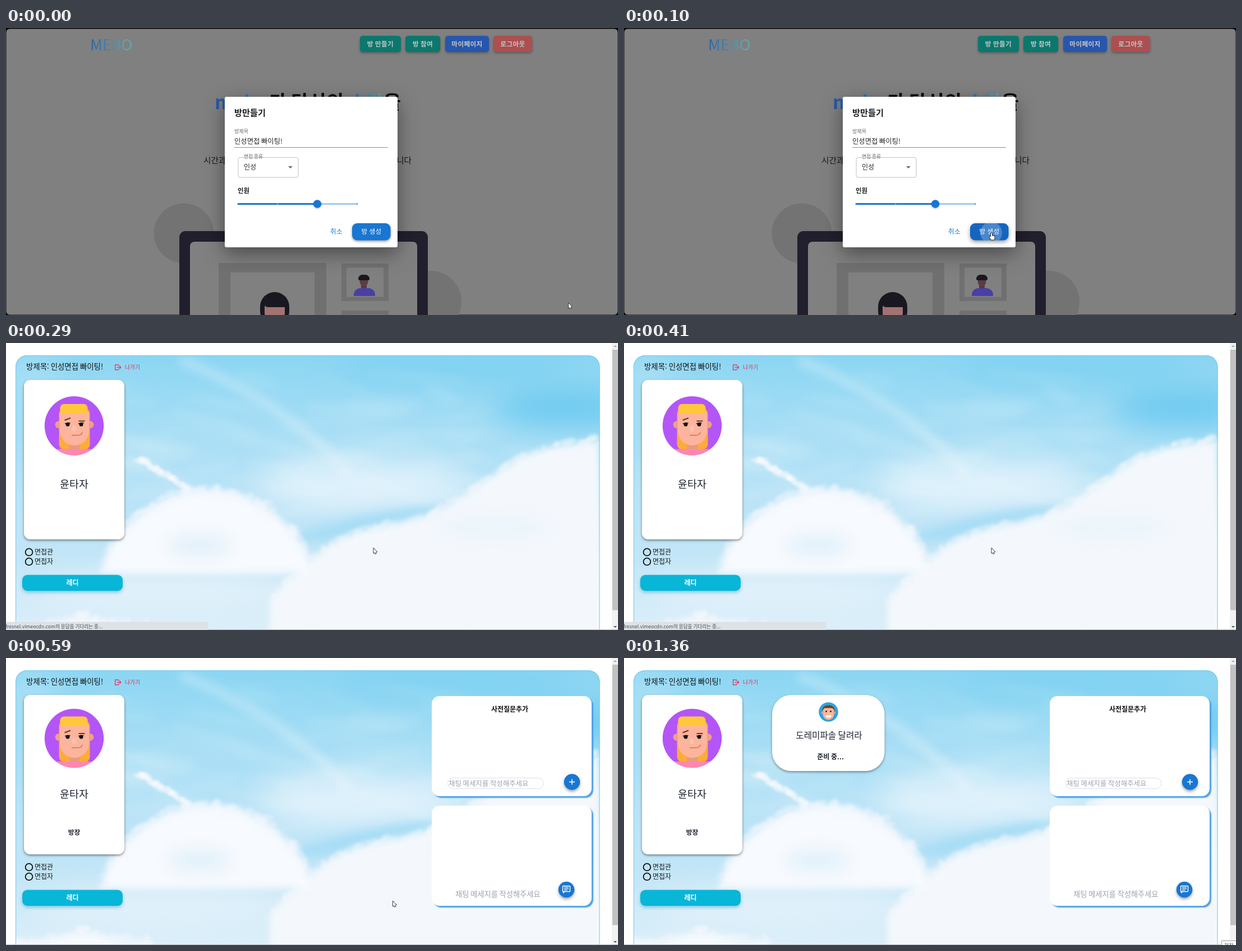
Write an HTML page with a canvas that moves like this. It is 1091 px wide and 513 px high and loops after 1800 ms.

```html
<!DOCTYPE html>
<html lang="ko">
<head>
<meta charset="utf-8">
<title>면접 방 만들기</title>
<style>
  html, body { margin: 0; width: 100%; height: 100%; overflow: hidden; background: #fff; }
  canvas { display: block; }
</style>
</head>
<body>
<canvas id="stage" width="1091" height="513"></canvas>
<script>
const W = 1091, H = 513, LOOP = 1800;
const CUTS = [100, 200, 290, 490, 590, 690];
const FONT = '"Noto Sans CJK KR", "Noto Sans CJK", "Noto Sans", sans-serif';
const BLUE = '#1976d2', INK = '#1c2330';
const stage = document.getElementById('stage');
let ctx = stage.getContext('2d');

// ---- helpers ----
// y is the optical centre of the line
function text(s, x, y, size, color, { weight = 400, align = 'left', space = 0 } = {}) {
  ctx.font = `${weight} ${size}px ${FONT}`;
  ctx.letterSpacing = space + 'px';
  ctx.textAlign = align;
  ctx.fillStyle = color;
  ctx.fillText(s, x, y + size * 0.38);
  ctx.letterSpacing = '0px';
}

function fill(color) {
  ctx.fillStyle = color;
  ctx.fill();
}

function stroke(color, width = 1) {
  ctx.strokeStyle = color;
  ctx.lineWidth = width;
  ctx.stroke();
}

function rounded(x, y, w, h, r) {
  ctx.beginPath();
  ctx.roundRect(x, y, w, h, r);
}

function box(x, y, w, h, r, color) {
  rounded(x, y, w, h, r);
  fill(color);
}

function frame(x, y, w, h, r, color, width) {
  rounded(x, y, w, h, r);
  stroke(color, width);
}

function oval(x, y, rx, ry, color, tilt = 0) {
  ctx.beginPath();
  ctx.ellipse(x, y, rx, ry, tilt, 0, Math.PI * 2);
  fill(color);
}

const disc = (x, y, r, color) => oval(x, y, r, r, color);

function line(x0, y0, x1, y1, color, width) {
  ctx.beginPath();
  ctx.moveTo(x0, y0);
  ctx.lineTo(x1, y1);
  stroke(color, width);
}

// triangle with a flat side of width 2r, pointing up (dir -1) or down (dir 1)
function caret(x, y, r, h, dir, color) {
  ctx.beginPath();
  ctx.moveTo(x - r, y);
  ctx.lineTo(x + r, y);
  ctx.lineTo(x, y + h * dir);
  fill(color);
}

function scoped(draw) {
  ctx.save();
  draw();
  ctx.restore();
}

function at(x, y, draw) {
  scoped(() => {
    ctx.translate(x, y);
    draw();
  });
}

function shadow(color, dx, dy, blur, draw) {
  scoped(() => {
    ctx.shadowColor = color;
    ctx.shadowOffsetX = dx;
    ctx.shadowOffsetY = dy;
    ctx.shadowBlur = blur;
    draw();
  });
}

function blurred(soft, draw) {
  scoped(() => {
    ctx.filter = `blur(${soft}px)`;
    draw();
  });
}

function ramp(x0, y0, x1, y1, ...colors) {
  const g = ctx.createLinearGradient(x0, y0, x1, y1);
  colors.forEach((c, i) => g.addColorStop(i / (colors.length - 1), c));
  return g;
}

function seeded(seed) {
  return () => (seed = (seed * 16807) % 2147483647) / 2147483647;
}

// ---- pointers ----
function arrow(x, y) {
  at(x, y, () => {
    line(2.5, 6, 4.9, 11.2, '#222', 3);
    ctx.beginPath();
    ctx.moveTo(0.5, 0);
    ctx.lineTo(0.5, 10);
    ctx.lineTo(7.3, 7.2);
    ctx.closePath();
    fill('#fff');
    stroke('#222', 0.9);
    line(2.5, 6, 4.6, 10.5, '#fff', 1.4);
  });
}

function hand(x, y) {
  at(x, y, () => {
    for (const [grow, color] of [[0.9, '#222'], [0, '#fff']]) {
      const part = (px, py, w, h) => box(px - grow, py - grow, w + 2 * grow, h + 2 * grow, 1.5 + grow, color);
      part(-1, 0.5, 2, 10);
      part(-1.5, 5.5, 7, 7);
      part(-3.5, 7.5, 4, 2.5);
    }
  });
}

// ---- landing page with dialog ----
function navButton(label, x, w, color) {
  shadow('rgba(0,0,0,.3)', 0, 2, 4, () => box(x, 14, w, 29, 5, color));
  text(label, x + w / 2, 28.5, 11.6, '#c4c8c8', { weight: 700, align: 'center', space: 0.4 });
}

function picture(x, y, w, h, margin) {
  box(x, y, w, h, 0, '#707070');
  box(x + margin, y + margin * 0.8, w - 2 * margin, h - 1.6 * margin, 0, '#808080');
}

function illustration() {
  const ink = '#211f2d', hair = '#191821';
  disc(317, 367, 53.5, '#737373');
  disc(757, 489, 55, '#737373');
  box(309, 363, 443, 170, 11, ink);
  box(328, 382, 405, 150, 8, '#808080');
  picture(379, 420, 192, 130, 21);
  picture(598, 421, 84, 67, 9);
  picture(598, 505, 84, 67, 9);

  box(453, 472, 52, 60, 26, hair);
  box(461, 485, 36, 40, 16, '#a17373');
  box(461, 483, 36, 16, [14, 14, 0, 8], hair);

  box(633, 455, 10, 14, 3, '#573a40');
  box(620, 465, 38, 14, [12, 12, 0, 0], '#4840a4');
  oval(638, 453, 7.5, 9, '#5b3d43');
  box(628, 441, 20, 10, [8, 8, 3, 3], hair);
}

function landing() {
  box(0, 0, W, H, 0, '#000');
  box(0.5, 1.5, W - 1, H - 2, 6, '#808080');
  text('MEBO', 150, 30, 27, ramp(150, 0, 215, 0, '#2b62a8', '#63a5aa'), { weight: 500 });
  navButton('방 만들기', 631, 73, '#0c776d');
  navButton('방 참여', 712, 62, '#0c776d');
  navButton('마이페이지', 783, 78, '#2856ad');
  navButton('로그아웃', 869, 69, '#ac4f50');

  const bold = { weight: 900 }, right = { weight: 900, align: 'right' };
  text('mebo', 372, 132, 34, ramp(372, 0, 470, 0, '#2455a8', '#4787a8'), bold);
  text('을', 704, 132, 34, '#080808', right);
  text('소망', 673, 132, 34, ramp(612, 0, 673, 0, '#2c65a8', '#63a5aa'), right);
  text('가 당신의', 602, 132, 34, '#080808', right);
  text('시간과', 352, 236, 14.6, '#161616', { weight: 300 });
  text('있습니다', 723, 236, 14.6, '#161616', { weight: 300, align: 'right' });
  illustration();
}

function dialog(pressed) {
  shadow('rgba(0,0,0,.42)', 0, 11, 34, () => box(390, 123, 308, 269, 3, '#fff'));
  text('방만들기', 407, 151, 15.2, '#1d1d1d', { weight: 700 });
  text('방제목', 407, 184.5, 9.1, '#6b6b6b');
  text('인성면접 빠이팅!', 407, 202.5, 12.3, '#262626');
  line(407, 213.5, 681, 213.5, '#8c8c8c');

  frame(414, 231.5, 107, 35.5, 3, '#c0c0c0');
  text('면접 종류', 424, 230, 8.7, '#666');
  text('인성', 424, 248.5, 12, '#262626');
  caret(507, 247, 4, 4, 1, '#6b6b6b');

  text('인원', 413, 291, 11.4, '#1d1d1d', { weight: 700 });
  box(412.5, 313, 215, 3, 1.5, '#a6c9ee');
  box(412.5, 313, 143, 3, 1.5, BLUE);
  box(483.5, 313.5, 1.4, 2, 0, '#9cc4ec');
  box(625.5, 313.5, 1.4, 2, 0, BLUE);
  shadow('rgba(0,0,0,.3)', 0, 1, 3, () => disc(555, 314.5, 7.2, BLUE));

  text('취소', 578, 363.5, 11.6, BLUE, { space: 0.4 });
  scoped(() => {
    const outline = [617, 349, 68.5, 30.5, 9];
    shadow('rgba(0,0,0,.4)', 0, pressed ? 3 : 2, pressed ? 7 : 4,
      () => box(...outline, pressed ? '#1565c0' : BLUE));
    rounded(...outline);
    ctx.clip();
    text('방 생성', 651.5, 363.5, 11.6, '#fff', { align: 'center', weight: 500, space: 0.4 });
    if (pressed) disc(654.5, 366, 19.5, 'rgba(255,255,255,.22)');
  });
}

// ---- sky, painted once ----
const rand = seeded(77);
const spread = (a, b) => a + (b - a) * rand();

// white mass below a ridge y(f), f = 0..1 from left to right
function cloud(left, right, base, ridge, color, puffs) {
  const span = right - left;
  blurred(7, () => {
    ctx.beginPath();
    ctx.moveTo(left, base);
    for (let f = 0; f <= 1; f += 0.02) ctx.lineTo(left + span * f, ridge(f));
    ctx.lineTo(right, base);
    fill(color);
  });
  blurred(2.5, () => {
    ctx.globalAlpha = 0.35;
    for (let i = 0; i < puffs; i++) {
      const f = rand();
      oval(left + span * f, ridge(f) + spread(-7, 16), spread(3, 14), spread(2, 8), color, -0.4);
    }
  });
}

// thin veils: many faint slanted streaks
function veils(count) {
  blurred(9, () => {
    for (let i = 0; i < count; i++) {
      const x = spread(150, 950), y = spread(60, 290);
      oval(x, y, spread(30, 120), spread(4, 14), 'rgba(240,249,254,.13)', spread(-0.3, 0.4));
    }
  });
}

function paintSky() {
  const sheet = document.createElement('canvas');
  sheet.width = W;
  sheet.height = H;
  const main = ctx;
  ctx = sheet.getContext('2d');
  box(0, 0, W, H, 0, ramp(0, 22, 0, H, '#8bd6f3', '#a4ddf5', '#b9e3f7', '#c3e6f7', '#dceffa'));
  blurred(26, () => {
    oval(1000, 115, 130, 34, '#6ccaf0');
    oval(800, 45, 220, 22, '#7bd0f1');
    oval(40, 90, 60, 70, '#a6def5');
    oval(640, 255, 190, 44, '#e0f1fb');
    oval(280, 445, 240, 34, '#e2f1fa');
  });
  blurred(8, () => {
    ctx.beginPath();
    ctx.moveTo(310, 30);
    ctx.quadraticCurveTo(490, 100, 612, 235);
    stroke('rgba(255,255,255,.25)', 20);
    oval(645, 324, 135, 17, '#a8ddf5', -0.2);
  });
  veils(60);
  cloud(470, 1070, 530, f => 450 - 290 * f ** 0.8 + 16 * Math.sin((f - 0.35) * 11), '#f4f8fd', 130);
  cloud(172, 545, 412, f => 402 - 140 * Math.sin(Math.PI * f) ** 0.6, '#f7fafe', 110);
  cloud(0, 260, 530, f => 498 + 8 * Math.sin(f * 9), '#f5fafe', 30);
  blurred(2, () => {
    for (let f = 0; f < 1; f += 0.03) {
      oval(236 + 86 * f + spread(-5, 5), 209 + 46 * f + spread(-5, 5), spread(4, 9), spread(3, 6),
        'rgba(250,252,255,.5)', 0.4);
    }
  });
  blurred(14, () => {
    oval(345, 362, 55, 18, '#e0f0fa');
    oval(870, 330, 100, 14, '#e8f3fb');
  });
  ctx = main;
  return sheet;
}

// ---- waiting room ----
function exitIcon(x, y, color) {
  for (const side of [-1, 1]) {
    line(x, y + side * 4.5, x + 6.5, y + side * 4.5, color, 1.2);
    line(x + 6.5, y + side * 5, x + 6.5, y + side * 2.5, color, 1.2);
    line(x + 8, y + side * 2.8, x + 10.8, y, color, 1.2);
  }
  line(x + 0.6, y - 5, x + 0.6, y + 5, color, 1.2);
  line(x + 3.5, y, x + 10.5, y, color, 1.2);
}

function hostAvatar(y) {
  const skin = '#fdb49c', brow = '#6a3a1c';
  at(121.5, y, () => {
    scoped(() => {
      rounded(-52.7, -52.7, 105.4, 105.4, 52.7);
      ctx.clip();
      ctx.fillStyle = '#b455f7';
      ctx.fillRect(-60, -60, 120, 120);
      box(-27, -32, 55, 75, 10, '#fbac3a');
      box(-9, 25, 19, 20, 0, '#e99a7c');
      box(-60, 41.5, 120, 20, 0, '#ff86b0');
      for (const side of [-1, 1]) disc(0.5 + side * 28, -2, 6.5, '#f0a083');
      box(-25.5, -28, 52, 63, [8, 8, 26, 26], skin);
      box(-25, -39, 49, 17, 7, '#ffc739');
    });
    line(-17, -10, -6.5, -14, brow, 2);
    line(8, -8.5, 19, -8.5, brow, 2);
    for (const x of [-11.5, 12.5]) {
      disc(x, -2.5, 3.5, '#111');
      line(x - 5, -4, x + 4.5, -5, '#111', 1.3);
    }
    oval(0, 5, 3.8, 5.5, '#ffc4af');
    ctx.beginPath();
    ctx.moveTo(-4.5, 17);
    ctx.lineTo(6, 17);
    ctx.quadraticCurveTo(13, 17, 15, 11.5);
    stroke('#c9745e', 1.4);
  });
}

function guestCard() {
  shadow('rgba(0,0,0,.4)', 0, 2, 4, () => box(264, 66, 200.5, 136, 34, '#fff'));
  at(364.5, 96.5, () => {
    disc(0, 0, 17.3, '#2ea2dc');
    box(-11, -12, 22, 12, [9, 9, 0, 0], '#6d4128');
    box(-10, -7, 20, 21, [5, 5, 10, 10], '#fbb79d');
    for (const side of [-1, 1]) {
      disc(side * 10.5, 1, 2.3, '#efa184');
      disc(side * 4, -1, 1.4, '#222');
    }
    box(-5, 6, 10, 4, [0, 0, 4, 4], '#fff');
  });
  text('도레미파솔 달려라', 365.5, 138, 15.6, INK, { weight: 300, align: 'center' });
  text('준비 중...', 368, 176, 12, INK, { weight: 700, align: 'center' });
}

function roundButton(x, y, drawIcon) {
  shadow('rgba(0,0,0,.35)', 0, 3, 5, () => disc(x, y, 14.3, BLUE));
  at(x, y, drawIcon);
}

function sidePanels() {
  const hint = '채팅 메세지를 작성해주세요', pale = '#9ca3af';
  for (const y of [68, 264]) {
    shadow('#4c9fe6', 3, 3, 2, () => box(759, y, 285, 179, 14, '#fff'));
  }
  text('사전질문추가', 898, 91, 12, '#111', { weight: 700, align: 'center' });
  frame(787.5, 214.5, 170.5, 19, 9, '#dcdfe3');
  text(hint, 789, 224, 12.4, pale);
  text(hint, 801, 422, 13.2, pale);
  roundButton(1009, 221.5, () => {
    line(-5, 0, 5, 0, '#fff', 1.6);
    line(0, -5, 0, 5, '#fff', 1.6);
  });
  roundButton(999, 414, () => {
    frame(-6.5, -6.5, 13, 10, 1, '#fff', 1.4);
    caret(-5, 3.5, 2, 3.5, 1, '#fff');
    for (let i = 0; i < 3; i++) line(-4, -4 + i * 2.5, i < 2 ? 4 : 1.5, -4 + i * 2.5, '#fff', 1.2);
  });
}

function scrollbar() {
  box(1080, 0, 11, H, 0, '#f1f1f1');
  box(1081, 12, 10, 465.5, 0, '#c1c1c1');
  caret(1086, 7, 3, 3, -1, '#a3a3a3');
  caret(1086, 506, 3, 3, 1, '#505050');
}

function statusBar() {
  box(0, 498.5, 360.5, 14.5, [0, 3, 0, 0], '#dee1e6');
  text('fresnel.vimeocdn.com의 응답을 기다리는 중...', -1, 506.5, 8.6, '#4c5056');
}

function tooltip() {
  box(1065, 505, 30, 12, 0, '#fff');
  frame(1065.5, 505.5, 30, 12, 0, '#9a9a9a');
  text('저장', 1070, 513.5, 9, '#555');
}

function heading(loaded) {
  const x = loaded ? 194 : 99, color = loaded ? '#f0284f' : '#44525b';
  text(loaded ? '방제목: 인성면접 빠이팅!' : '방제목:', 36, 41.5, 13.4, '#111');
  exitIcon(x, 43.5, color);
  text('나가기', x + 18, 43.5, 9.8, color, { weight: 300 });
}

function hostCard(loaded, joined) {
  shadow('rgba(0,0,0,.45)', 0, 2, 4, () => box(32, 66, 179, 285, 11, '#fff'));
  if (loaded) hostAvatar(joined ? 143.5 : 148);
  text('윤타자', 121.5, joined ? 243.5 : 252, 18.4, INK, { weight: 300, align: 'center' });
  if (joined) text('방장', 121.5, 312, 11.8, INK, { weight: 700, align: 'center' });
}

function roleChoice() {
  ['면접관', '면접자'].forEach((label, i) => {
    const y = 373.5 + i * 17;
    frame(34.6, y - 6.1, 12.8, 12.8, 6.4, '#111', 1.8);
    text(label, 51, y, 12, '#1a1f26');
  });
  shadow('rgba(6,140,180,.4)', 0, 3, 6, () => box(29, 414.5, 179, 28.5, 9, '#08b6d8'));
  text('레디', 118.5, 428.5, 12, '#fff', { weight: 700, align: 'center' });
}

function room(step) {
  const loaded = step >= 3, joined = step >= 4, full = step >= 6;
  box(0, 0, W, H, 0, '#fff');
  scoped(() => {
    rounded(17, 22, 1041.5, 520, 20);
    ctx.clip();
    ctx.drawImage(sky, 0, 0);
  });
  frame(17.5, 22.5, 1040.5, 520, 20, '#72c9ea');
  heading(loaded);
  hostCard(loaded, joined);
  roleChoice();
  if (joined) sidePanels();
  if (full) guestCard();
  scrollbar();
  line(0, 512.5, W, 512.5, '#b4b7ba');
  if (!joined) statusBar();
  if (full) tooltip();
}

// ---- playback ----
const sky = paintSky();
const POINTERS = { 0: [1002, 491], 2: [654.5, 366], 3: [654.5, 366], 4: [444, 370], 5: [689, 434] };
const start = performance.now();

function draw() {
  const t = (performance.now() - start) % LOOP;
  const step = CUTS.filter(c => t >= c).length;
  ctx.clearRect(0, 0, W, H);
  if (step < 2) {
    landing();
    dialog(step === 1);
    if (step === 1) hand(655, 366);
  } else {
    room(step);
  }
  if (POINTERS[step]) arrow(...POINTERS[step]);
  requestAnimationFrame(draw);
}
draw();
</script>
</body>
</html>
```
